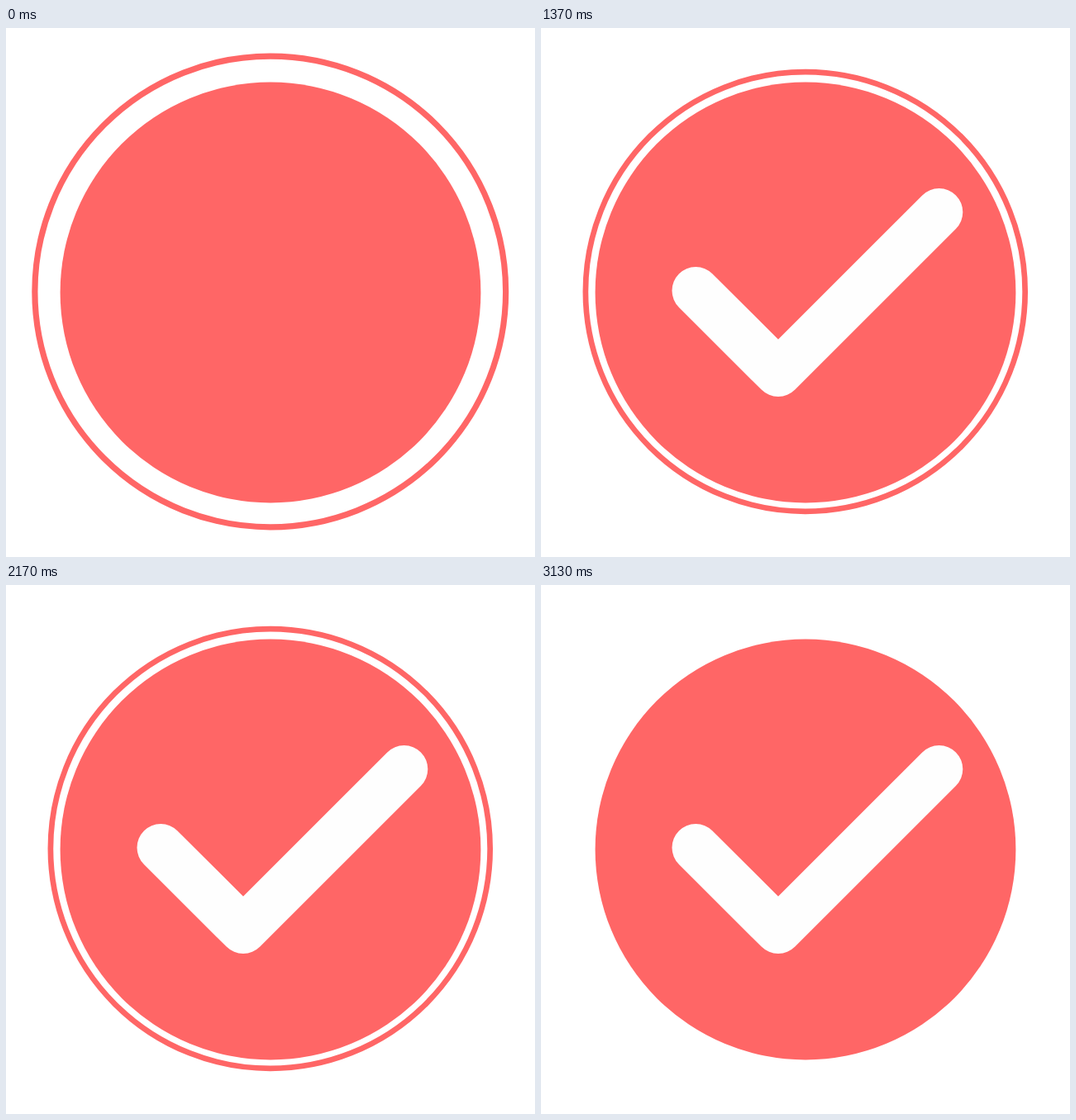
Write an HTML page that moves like this. It is 640x640 px and loops after 3610 ms.

```html
<!DOCTYPE html>
<html lang="en">
<head>
<meta charset="utf-8">
<title>Check button</title>
<style>
  html, body { margin: 0; width: 100%; height: 100%; overflow: hidden; background: #fff; }
  svg { display: block; width: 100vw; height: 100vh; }
</style>
</head>
<body>
<svg viewBox="0 0 640 640">
  <circle id="ring" cx="-0.2" cy="-0.9" r="237.4" fill="none" stroke="#f66" stroke-width="6"/>
  <circle id="disc" r="254.4" fill="#f66"/>
  <path id="check" d="M-132.8 -2.3L-33 97.3L161.6 -97.3" fill="none" stroke="#fefefe"
        stroke-width="57.4" stroke-linecap="round" stroke-linejoin="round"/>
</svg>
<script>
  const LOOP = 3610;
  const TICK = 1000 / 30;

  // Scale of each part as [step, value], 25 steps per second
  const tracks = {
    ring: [[0, 1.2], [30, 1.2], [40, 1], [50, 1.2], [60, 1], [70, 1.2], [80, 1]],
    disc: [[0, 1], [5, 0.8], [10, 1]],
    check: [[11, 0], [21, 1.1], [25, 1]]
  };

  function valueAt(keys, step) {
    if (step <= keys[0][0]) return keys[0][1];
    for (let i = 1; i < keys.length; i++) {
      const [a, from] = keys[i - 1];
      const [b, to] = keys[i];
      if (step <= b) return from + (to - from) * (step - a) / (b - a);
    }
    return keys[keys.length - 1][1];
  }

  // The 25 fps motion is shown on a 30 fps clock
  function stepAt(ms) {
    const tick = Math.floor((ms + 3.4) / TICK);
    return Math.ceil(tick * 5 / 6 - 0.5);
  }

  function draw(ms) {
    const step = stepAt(ms % LOOP);
    for (const id in tracks) {
      const scale = valueAt(tracks[id], step);
      const part = document.getElementById(id);
      part.setAttribute("visibility", scale > 0 ? "visible" : "hidden");
      part.setAttribute("transform", `translate(320 320) scale(${scale})`);
    }
  }

  const start = performance.now();
  function loop() {
    draw(performance.now() - start);
    requestAnimationFrame(loop);
  }
  loop();
</script>
</body>
</html>
```
